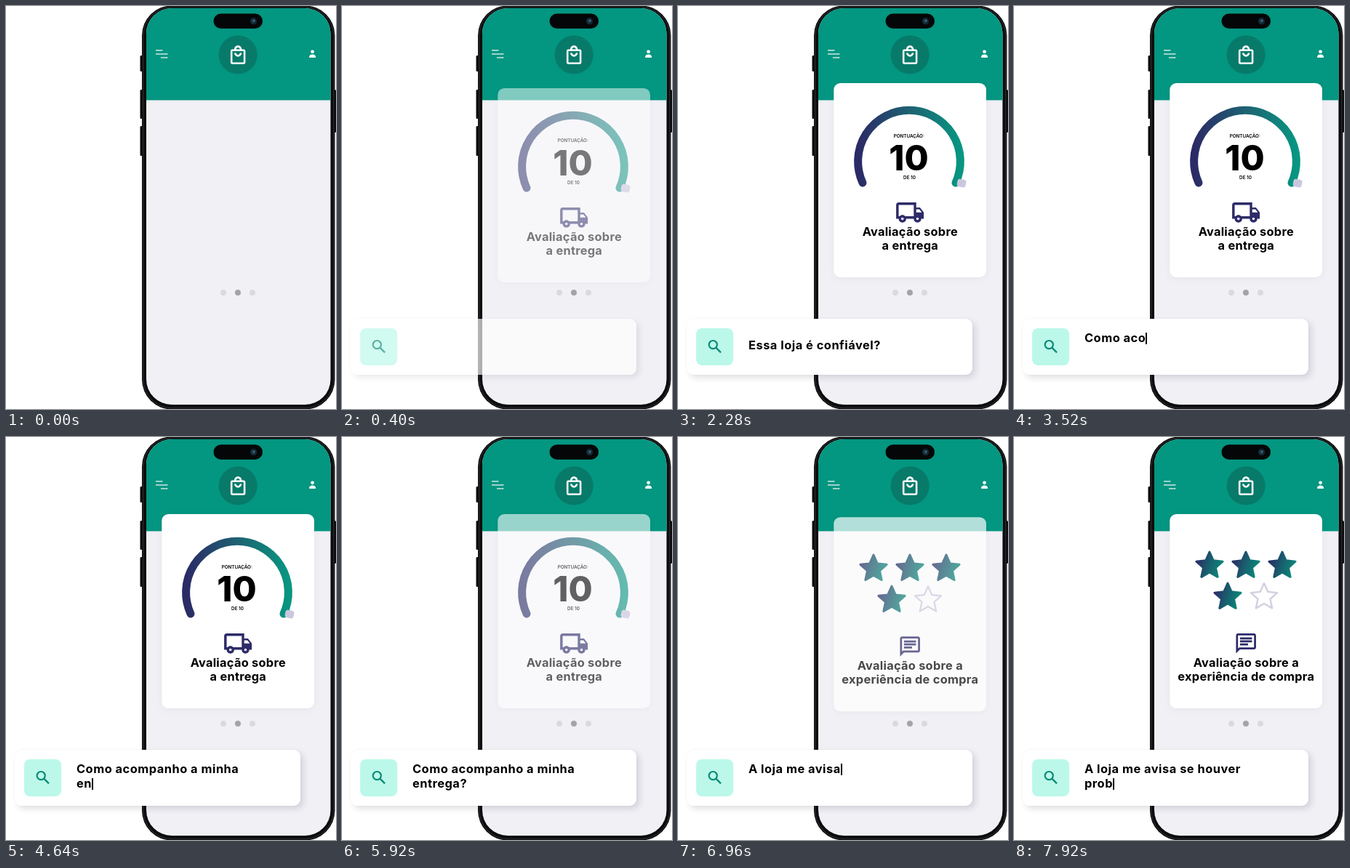
An HTML page for the animation above (8 s loop, 454x554 px).

```html
<!DOCTYPE html>
<html lang="pt">
<head>
<meta charset="utf-8">
<title>Avaliação da loja</title>
<style>
  html, body { margin: 0; width: 100%; height: 100%; overflow: hidden; background: #fff; }
  body { position: relative; font-family: Inter, "Open Sans", sans-serif; color: #000; }
  svg { position: absolute; left: 0; top: 0; display: block; }
  text { text-anchor: middle; font-weight: 700; }
  .title { font-size: 16.4px; letter-spacing: .25px; }
  .small { font-size: 6.3px; font-weight: 600; }
  .score { font-size: 48px; font-weight: 800; }
  .panel { fill: #fff; filter: drop-shadow(0 2px 5px rgba(40, 40, 80, .05)); }
  .ink { fill: #2d2b68; }

  #delivery { animation: delivery 8s linear infinite; }
  #shopping { animation: shopping 8s linear infinite; }
  #bar { animation: bar 8s linear infinite; }
  @keyframes delivery {
    0% { opacity: 0; transform: translateY(14px); }
    10%, 70% { opacity: 1; transform: none; }
    80%, 100% { opacity: 0; transform: none; }
  }
  @keyframes shopping {
    0%, 80% { opacity: 0; transform: translateY(14px); }
    90%, 100% { opacity: 1; transform: none; }
  }
  @keyframes bar {
    0% { opacity: 0; }
    7.5%, 100% { opacity: 1; }
  }

  #bar {
    position: absolute; left: 12px; top: 430px; width: 393px; height: 76.5px;
    border-radius: 9px; background: #fff;
    box-shadow: 4px 4px 9px rgba(30, 30, 60, .14), 0 0 3px rgba(30, 30, 60, .04);
  }
  #icon {
    position: absolute; left: 12.5px; top: 13px; width: 51.5px; height: 51px;
    border-radius: 8px; background: #bbf8e9;
  }
  #query {
    position: absolute; left: 85px; white-space: pre;
    font-size: 16.4px; font-weight: 700; line-height: 19.2px; letter-spacing: .5px;
  }
  #caret {
    display: inline-block; width: 2px; height: 16px; margin-right: -2px;
    vertical-align: -3px; background: #000;
  }
</style>
</head>
<body>
<svg width="454" height="554" viewBox="0 0 454 554">
  <defs>
    <linearGradient id="arc" gradientUnits="userSpaceOnUse" x1="248" y1="0" x2="388" y2="0">
      <stop offset="0" stop-color="#2b2a66"/>
      <stop offset=".5" stop-color="#1e6272"/>
      <stop offset="1" stop-color="#089581"/>
    </linearGradient>
    <linearGradient id="shade" x1="0" y1=".3" x2="1" y2=".6">
      <stop offset="0" stop-color="#2b2a66"/>
      <stop offset=".5" stop-color="#195f6e"/>
      <stop offset="1" stop-color="#0a8a7a"/>
    </linearGradient>
    <clipPath id="screen"><rect x="193" y="3" width="253.5" height="545" rx="35"/></clipPath>
  </defs>

  <!-- phone -->
  <g fill="#0b0c0d">
    <rect x="184.5" y="68" width="5" height="22" rx="1.5"/>
    <rect x="184.5" y="115" width="5" height="40" rx="1.5"/>
    <rect x="184.5" y="165" width="5" height="41" rx="1.5"/>
    <rect x="449" y="115" width="5" height="59" rx="1.5"/>
    <rect x="187" y="-.5" width="265.5" height="555" rx="41"/>
  </g>
  <rect x="188.8" y="1.2" width="262" height="551.5" rx="39.5" fill="none" stroke="#3b3e41" stroke-width=".8"/>
  <g clip-path="url(#screen)">
    <rect x="193" y="0" width="254" height="554" fill="#f0f0f5"/>
    <rect x="193" y="0" width="254" height="129.5" fill="#039681"/>
  </g>
  <rect x="285.5" y="10.5" width="67.5" height="20.5" rx="10.25" fill="#050607"/>
  <circle cx="340.5" cy="20.8" r="5" fill="#13202b"/>
  <circle cx="340.5" cy="20.8" r="2.8" fill="#1f4257"/>
  <circle cx="341.3" cy="20" r="1" fill="#4d8795"/>

  <!-- header -->
  <path d="M206 61h9.5M206 66h16.5M213 71h9.5" stroke="#c9e9e4" stroke-width="1.4"/>
  <circle cx="319.2" cy="67" r="26.5" fill="#077a69"/>
  <path transform="translate(303.8 51.8) scale(1.28)" fill="#fff" d="M18 6h-2c0-2.21-1.79-4-4-4S8 3.79 8 6H6c-1.1 0-2 .9-2 2v12c0 1.1.9 2 2 2h12c1.1 0 2-.9 2-2V8c0-1.1-.9-2-2-2zm-6-2c1.1 0 2 .9 2 2h-4c0-1.1.9-2 2-2zm6 16H6V8h12v12zm-6-8c-1.1 0-2-.9-2-2H8c0 2.21 1.79 4 4 4s4-1.79 4-4h-2c0 1.1-.9 2-2 2z"/>
  <g fill="#fff">
    <circle cx="421.6" cy="62.8" r="2.4"/>
    <path d="M417.2 71v-1.6c0-2 2.6-3 4.4-3s4.4 1 4.4 3v1.6z"/>
  </g>

  <!-- pager -->
  <circle cx="299" cy="394" r="4" fill="#dadade"/>
  <circle cx="319" cy="394" r="4" fill="#a4a4a8"/>
  <circle cx="339" cy="394" r="4" fill="#dadade"/>

  <g id="delivery">
    <rect class="panel" x="214.3" y="106" width="209.7" height="267" rx="9"/>
    <rect x="383" y="238.3" width="13" height="10.4" rx="3.5" fill="#cac7de" transform="rotate(12 389.5 243.5)"/>
    <path d="M254 243A70.4 70.4 0 1 1 382 243" fill="none" stroke="url(#arc)" stroke-width="11" stroke-linecap="round"/>
    <rect x="384" y="238.3" width="12" height="10.4" rx="3.5" fill="#cac7de" transform="rotate(12 390 243.5)"/>
    <text class="small" x="317.8" y="180.5">PONTUAÇÃO:</text>
    <text class="score" x="317.5" y="226">10</text>
    <text class="small" x="318.5" y="238">DE 10</text>
    <path class="ink" transform="translate(298.4 263.1) scale(1.727)" d="M20 8h-3V4H3c-1.1 0-2 .9-2 2v11h2c0 1.66 1.34 3 3 3s3-1.34 3-3h6c0 1.66 1.34 3 3 3s3-1.34 3-3h2v-5l-3-4zm-.5 1.5l1.96 2.5H17V9.5h2.5zM6 18c-.55 0-1-.45-1-1s.45-1 1-1 1 .45 1 1-.45 1-1 1zm2.22-3c-.55-.61-1.33-1-2.22-1s-1.67.39-2.22 1H3V6h12v9H8.22zM18 18c-.55 0-1-.45-1-1s.45-1 1-1 1 .45 1 1-.45 1-1 1z"/>
    <text class="title" x="319.3" y="316">Avaliação sobre</text>
    <text class="title" x="319.3" y="335.3">a entrega</text>
  </g>

  <g id="shopping">
    <rect class="panel" x="214.3" y="106" width="209.7" height="267" rx="9"/>
    <g id="stars" stroke-linejoin="round"></g>
    <path class="ink" transform="translate(302.7 267.2) scale(1.375)" d="M4 4h16v12H5.17L4 17.17V4m0-2c-1.1 0-1.99.9-1.99 2L2 22l4-4h14c1.1 0 2-.9 2-2V4c0-1.1-.9-2-2-2H4zm2 10h8v2H6v-2zm0-3h12v2H6V9zm0-3h12v2H6V6z"/>
    <text class="title" x="319.3" y="316">Avaliação sobre a</text>
    <text class="title" x="319.3" y="335.3">experiência de compra</text>
  </g>
</svg>

<div id="bar">
  <div id="icon">
    <svg width="52" height="51" fill="none" stroke="#0b8a77" stroke-width="2.2">
      <circle cx="23.2" cy="22.6" r="5.6"/>
      <path d="M27.2 26.6L34 33.4"/>
    </svg>
  </div>
  <div id="query"><span id="typed"></span><span id="caret"></span></div>
</div>

<script>
  const $ = id => document.getElementById(id);

  // Stars: four filled, one outlined
  const star = (cx, cy, r) => 'M' + Array.from({ length: 10 }, (_, i) => {
    const a = (i / 5 - .5) * Math.PI, d = i % 2 ? r * .47 : r;
    return (cx + d * Math.cos(a)).toFixed(2) + ' ' + (cy + d * Math.sin(a)).toFixed(2);
  }).join('L') + 'Z';
  const spots = [[269, 177], [319, 177], [369, 177], [294, 220], [344, 220]];
  $('stars').innerHTML = spots.map(([x, y], i) => {
    const paint = i < 4
      ? 'fill="url(#shade)" stroke="url(#shade)" stroke-width="3"'
      : 'fill="#fff" stroke="#d2d0e0" stroke-width="2.4"';
    return `<path d="${star(x, y, 19)}" ${paint}/>`;
  }).join('');

  // Typed questions
  const LOOP = 8000, TICK = 40, CHAR = 63.5;
  const lines = [
    { start: 602, text: 'Essa loja é confiável?', wrap: 99, top: 27.4 },
    { start: 2992, text: 'Como acompanho a minha entrega?', wrap: 23, top: 17.4 },
    { start: 5992, text: 'A loja me avisa se houver prob', wrap: 26, top: 17.4 }
  ];

  function draw(time) {
    const t = Math.floor((time % LOOP + 1) / TICK) * TICK;
    const line = lines.filter(l => t >= l.start).pop();
    $('query').style.visibility = line ? 'visible' : 'hidden';
    if (!line) return;
    const { start, text, wrap, top } = line;
    const n = Math.min(text.length, Math.floor((t - start) / CHAR));
    const idle = t - start - text.length * CHAR;
    const blink = idle > 0 && Math.floor((idle - 40) / 240) % 2 === 1;
    $('query').style.top = top + 'px';
    $('typed').textContent = n > wrap
      ? text.slice(0, wrap) + '\n' + text.slice(wrap, n)
      : text.slice(0, n);
    $('caret').style.opacity = blink ? 0 : 1;
  }

  let origin;
  function frame(now) {
    origin ??= now;
    draw(now - origin);
    requestAnimationFrame(frame);
  }
  draw(0);
  requestAnimationFrame(frame);
</script>
</body>
</html>
```
